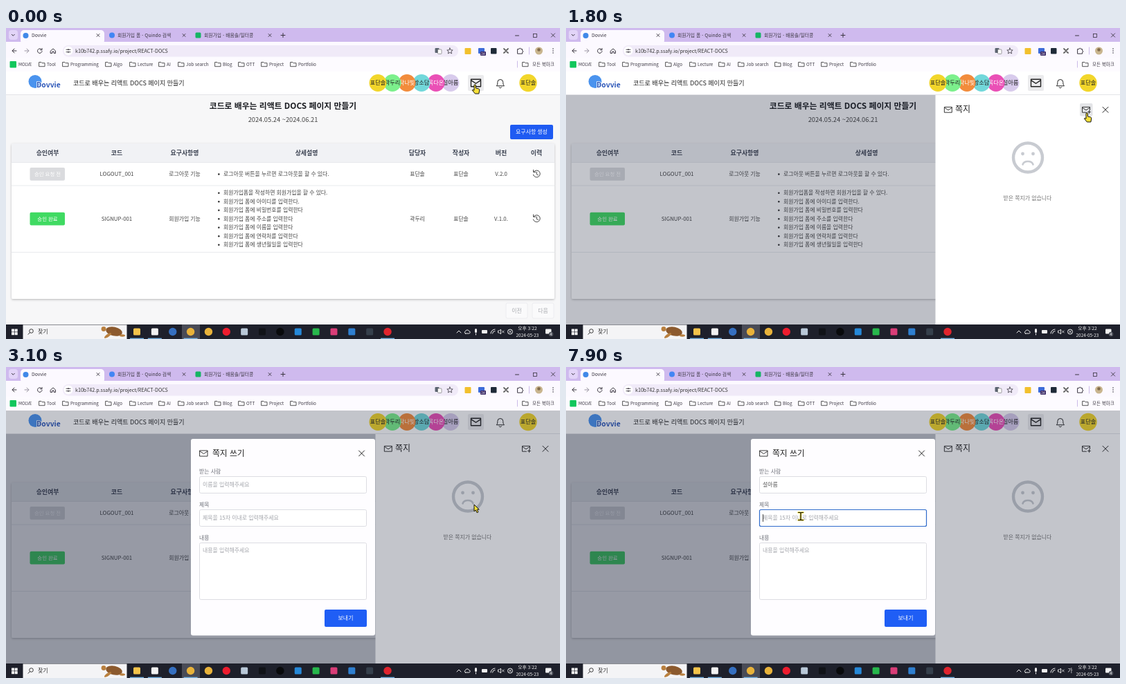
An HTML page that plays this animation: 800x450 px, repeating every 8 s.

```html
<!DOCTYPE html>
<html lang="ko">
<head>
<meta charset="utf-8">
<title>Message drawer</title>
<style>
html, body { margin: 0; width: 100%; height: 100%; overflow: hidden; background: #f7f7f8 }
svg { display: block; width: 800px; height: 450px; font-family: "Noto Sans CJK KR", "Noto Sans KR", "Noto Sans CJK", sans-serif; white-space: pre }
</style>
</head>
<body>
<svg id="stage" viewBox="0 0 800 450"></svg>
<script>
const PEOPLE = ['표단솔', '곽두리', '탁나빛', '방소담', '옥다온', '설아름'];
const TITLE = '코드로 배우는 리액트 DOCS 페이지 만들기';

// Drawing helpers, each returns SVG markup
const text = (x, cy, s, size, fill = '#333', more = '') =>
  `<text x="${x}" y="${cy + size * .36}" font-size="${size}" fill="${fill}" ${more}>${s}</text>`;
const MID = 'text-anchor="middle"', BOLD = 'font-weight="700"', LIGHT = 'font-weight="300"';
const mid = (x, cy, s, size, fill, more = '') => text(x, cy, s, size, fill, MID + ' ' + more);
const rect = (x, y, w, h, fill, r = 0, more = '') =>
  `<rect x="${x}" y="${y}" width="${w}" height="${h}" fill="${fill}" rx="${r}" ${more}/>`;
const circle = (x, y, r, fill, more = '') => `<circle cx="${x}" cy="${y}" r="${r}" fill="${fill}" ${more}/>`;
const line = (d, stroke = '#333', w = 1, more = '') =>
  `<path d="${d}" fill="none" stroke="${stroke}" stroke-width="${w}" stroke-linecap="round" stroke-linejoin="round" ${more}/>`;
const cross = (x, y, r, color = '#333', w = 1) =>
  line(`M${x - r} ${y - r}l${2 * r} ${2 * r}m0 ${-2 * r}l${-2 * r} ${2 * r}`, color, w);
const group = (id, body, more = '') => `<g id="${id}" ${more}>${body}</g>`;
const mail = (x, y, w, sw = .9) => {
  const h = w * .74, l = x - w / 2, t = y - h / 2;
  return line(`M${l} ${t}h${w}v${h}h${-w}zm0 ${h * .12}l${w / 2} ${h * .45}l${w / 2} ${-h * .45}`, '#222', sw);
};
const folder = (x, y) => line(`M${x - 4} ${y - 3}h3l1 1.2h4v5h-8z`, '#444', .9);
const field = (y, h) => rect(279.5, y + .5, 241, h - 1, '#fff', 2, 'stroke="#dcdde2"');
const focusRing = (id, y) => group(id,
  rect(279.5, y + .5, 241, 24, 'none', 2, 'stroke="#2f6bcb" stroke-width="1.2"') +
  group(id + 'Caret', line(`M284.5 ${y + 7.5}v10`, '#111', .8)));
const shade = (id, y) => rect(0, y, 800, 429 - y, '#1a1f38', 0, `id="${id}" opacity="0"`);

function browser() {
  const ink = '#3a3640';
  let s = rect(0, 0, 800, 22, '#cfbaee') + rect(4, 3, 13, 14, '#e2d4f8', 4) + line('M8.3 9.3l2 2l2-2', ink)
    + rect(21, 3, 121, 20, '#fcf9ff', 5) + rect(0, 20, 800, 23, '#fcf9ff') + rect(82, 25, 571, 16.5, '#f0eaf8', 8)
    + rect(0, 43, 800, 20, '#fdfbff');
  s += circle(28.5, 11, 4, '#4089e8') + text(37, 11, 'Dovvie', 6.8, ink)
    + circle(153, 10.5, 4, '#4285f4') + text(161, 11, '회원가입 폼 - Quindo 검색', 6.8, ink)
    + rect(273.5, 6.5, 8, 8, '#16b464', 1.5) + text(286, 11, '회원가입 - 배움솔/일터콩', 6.8, ink);
  for (const x of [133, 257, 381]) s += cross(x, 10.5, 2, ink, .9);
  s += line('M397 10.5h6m-3-3v6', ink) + line('M735.5 11h5', ink) + rect(761.5, 8.5, 5, 5, 'none', 0, `stroke="${ink}" stroke-width=".8"`) + cross(790, 10.5, 2.6, ink, .9);
  s += line('M15 33h-6m3-3l-3 3l3 3', ink) + line('M27 33h6m-3-3l3 3l-3 3', '#9b95a3')
    + line('M51.5 31.2a3.3 3.3 0 1 0 .6 2.4M52 29.5v2.3h-2.3', ink) + line('M64.5 33l3.5-3l3.5 3v3.5h-2.3v-2.5h-2.4v2.5h-2.3z', ink)
    + circle(90, 33, 6.5, '#fff') + line('M87 31.3h2m2 0h2m-6 3.4h2m2 0h2', ink, .9) + circle(90, 31.3, 1, ink) + circle(90, 34.7, 1, ink)
    + text(100, 33, 'k10b742.p.ssafy.io/project/REACT-DOCS', 7.15, '#333')
    + rect(619.5, 29, 6, 7, '#5b6470', 1) + rect(623.5, 31, 5.5, 6.5, '#fff', 1, 'stroke="#777" stroke-width=".7"')
    + line('M641 29l1.2 2.8l3 .2l-2.3 2l.8 3l-2.7-1.6l-2.7 1.6l.8-3l-2.3-2l3-.2z', ink, .8);
  s += rect(662.5, 29, 9, 9, '#f2c02c', 1) + rect(682, 29, 9, 8, '#3d6bd8', 1) + rect(685, 34, 8, 6, '#3b2a66', 1) + mid(689, 37, '2d', 4.5, '#fff')
    + rect(700, 29, 8.5, 8.5, '#1f2a38', 1) + cross(722, 33, 3, '#666', 1.8)
    + line('M739 30.5h2a1.2 1.2 0 0 1 2.5 0h2v2.3a1.2 1.2 0 0 1 0 2.4v2h-6.5z', ink, 1) + line('M755.5 28v10', '#cbbbe8')
    + circle(769.5, 33, 5.5, '#c9b58e') + circle(769.5, 31.5, 2.3, '#806a4c') + [30, 33, 36].map(y => circle(790, y, .8, ink)).join('');
  s += rect(5.5, 48, 9.5, 9.5, '#11c75c', 1) + text(18, 52.5, 'MOLVE', 6.1, ink);
  const marks = { Tool: 48, Programming: 82, Algo: 144, Lecture: 179, AI: 221, 'Job search': 249, Blog: 302, OTT: 336, Project: 369, Portfolio: 411 };
  for (const name in marks) s += folder(marks[name] + 4, 52.5) + text(marks[name] + 11, 52.5, name, 6.4, ink);
  return s + line('M738.5 48v9', '#cbbbe8') + folder(750, 52.5) + text(760, 52.5, '모든 북마크', 6.5, ink);
}

function navbar() {
  const colors = ['#f2d62b', '#7cf08c', '#f28c3c', '#72d8da', '#ea50b6', '#d8cbec'];
  let s = rect(0, 63, 800, 34, '#fff') + line('M0 96.5h800', '#e3e4e8')
    + circle(42, 77.5, 9.5, '#4a93ee') + text(44, 82, 'Dovvie', 10.3, '#2b56b8', BOLD + ' stroke="#fff" stroke-width="1.6" paint-order="stroke"')
    + text(97, 79.5, TITLE, 9, '#222');
  for (let i = 5; i >= 0; i--)
    s += circle(537 + 21 * i, 79.5, 12.5, colors[i]) + mid(537 + 21 * i, 79.5, PEOPLE[i], 8.2, i == 2 || i == 4 ? '#fff' : '#222');
  return s + rect(667, 68, 23, 23, '#ebebed', 2) + mail(678.5, 79.5, 14, 1.4)
    + line('M708.5 83.5c1.5-1.5 1.3-3 1.3-5a4 4 0 0 1 8 0c0 2 0 3.5 1.4 5zm3.7 2.2a1.7 1.7 0 0 0 3.2 0', '#222', 1)
    + circle(754, 79.5, 12.7, '#f2d62b') + mid(754, 79.5, PEOPLE[0], 8.2, '#222');
}

function requirements() {
  const cols = [60, 160, 258, 434, 594, 657, 715, 766];
  const heads = ['승인여부', '코드', '요구사항명', '상세설명', '담당자', '작성자', '버전', '이력'];
  const list = ['회원가입폼을 작성하면 회원가입을 할 수 있다.',
    ...['아이디를 입력한다.', '비밀번호를 입력한다', '주소를 입력한다', '이름을 입력한다', '연락처를 입력한다', '생년월일을 입력한다'].map(e => '회원가입 폼에 ' + e)];
  const row = (y, cells, state, color, items) => {
    let s = rect(34.5, y - 9.3, 50.5, 18.8, color, 2) + mid(60, y, state, 7.4, '#fff');
    for (const i in cells) if (cells[i]) s += mid(cols[i], y, cells[i], 7.85, '#444', LIGHT);
    items.forEach((item, i) => {
      const cy = y + (i - (items.length - 1) / 2) * 12.5;
      s += circle(307.3, cy + .3, 1.3, '#333') + text(314, cy, item, 7.85, '#444', LIGHT);
    });
    return s + line(`M762 ${y - 3}a5 5 0 1 1 -.6 4m.2-7v3.2h3.2M766.3 ${y - 2.8}v3.2l2.2 1.2`, '#444', 1);
  };
  let s = rect(0, 97, 800, 332, '#f7f7f8') + mid(400, 113, TITLE, 11.85, '#1b1d22', BOLD)
    + mid(400, 132.5, '2024.05.24 ~2024.06.21', 9.3, '#444', LIGHT)
    + rect(728, 140, 62, 21, '#1f5bf2', 2) + mid(759, 150.5, '요구사항 생성', 7.9, '#fff')
    + rect(8, 167, 784, 225, '#fff', 2, 'filter="url(#soft)"') + rect(8, 167, 784, 27.5, '#f1f2f5');
  heads.forEach((h, i) => s += mid(cols[i], 180.7, h, 8.9, '#3a4150', BOLD));
  for (const y of [194.5, 228, 324.5]) s += line(`M8 ${y}h784`, '#e3e5e9', .8);
  s += row(211.3, [0, 'LOGOUT_001', '로그아웃 기능', 0, PEOPLE[0], PEOPLE[0], 'V.2.0'], '승인 요청 전', '#dadbde', ['로그아웃 버튼을 누르면 로그아웃을 할 수 있다.'])
    + row(276, [0, 'SIGNUP-001', '회원가입 기능', 0, PEOPLE[1], PEOPLE[0], 'V.1.0.'], '승인 완료', '#40da62', list);
  ['이전', '다음'].forEach((label, i) =>
    s += rect(722 + 38 * i, 398, 31, 22, '#fafafb', 2, 'stroke="#ededf0"') + mid(737.5 + 38 * i, 409, label, 7.9, '#a9abb0'));
  return s;
}

const drawer = () => rect(533.5, 97, 267, 332, '#fff') + mail(552, 118.3, 10.5) + text(562, 118, '쪽지', 12, '#222')
  + rect(742, 109, 18.5, 18.5, '#e3e4e7', 2, 'id="hover"')
  + line('M751.5 122.2h-6v-7.8h11v4.5m-11-3.6l5.5 3.5l5.5-3.5m-3 6.2h4m-2-2v4', '#222', .9) + cross(779, 118.3, 4, '#222')
  + circle(667, 187.5, 21, 'none', 'stroke="#c8cbd1" stroke-width="4.4"')
  + circle(659.5, 182, 2.4, '#c8cbd1') + circle(674.5, 182, 2.4, '#c8cbd1') + line('M659.5 197.5c2-6 13-6 15 0', '#c8cbd1', 2.6)
  + mid(666.5, 246, '받은 쪽지가 없습니다', 7.9, '#777', LIGHT);

function dialog() {
  const team = ['2 (B742 기획자)', '5 (B742 PM)', '0 (B742 기획자)', '1 (B742 FE 개발자)', '3 (B742 INFRA 개발자)'];
  const hint = '#a3a5ab', label = '#6d7078';
  return rect(267, 104, 266, 284.5, '#fefdff', 3) + mail(285.5, 125, 11) + text(298, 124.5, '쪽지 쓰기', 11.8, '#222') + cross(513.5, 125, 4, '#222')
    + text(279, 151.5, '받는 사람', 7.9, label, LIGHT) + field(158, 25)
    + text(284, 170.5, '이름을 입력해주세요', 7.9, hint, LIGHT + ' id="nameHint"') + text(284, 170.5, PEOPLE[5], 7.9, '#555', LIGHT + ' id="nameValue"')
    + text(279, 199, '제목', 7.9, label, LIGHT) + field(206, 25) + text(284, 218.3, '제목을 15자 이내로 입력해주세요', 7.9, hint, LIGHT)
    + text(279, 247, '내용', 7.9, label, LIGHT) + field(254, 83) + text(284, 265, '내용을 입력해주세요', 7.9, hint, LIGHT)
    + rect(460, 351, 61, 25, '#1f5ef5', 2) + mid(490.5, 363.5, '보내기', 7.9, '#fff')
    + focusRing('nameFocus', 158) + focusRing('titleFocus', 206)
    + group('menu', rect(279, 184, 242, 126, '#fff', 2, 'filter="url(#soft)"') + rect(516.7, 185, 3.8, 101, '#d2d3d6', 1.5)
      + team.map((e, i) => text(290, 199.5 + 25 * i, PEOPLE[e[0]] + e.slice(1), 7.9, '#555', LIGHT)).join(''));
}

function taskbar() {
  let s = rect(0, 429, 800, 21, '#1e202b') + rect(24.5, 429.5, 150, 20.5, '#f4f4f6');
  for (const [x, y] of [[8, 435.5], [12.7, 435.5], [8, 440.2], [12.7, 440.2]]) s += rect(x, y, 4, 4, '#fff');
  s += circle(36.5, 438.5, 2.8, 'none', 'stroke="#333"') + line('M34.5 440.7l-2.5 2.6', '#333') + text(46, 439.5, '찾기', 8, '#333')
    + '<g fill="#b9803f"><ellipse cx="156" cy="439" rx="12" ry="6.5" transform="rotate(12 156 439)" fill="#8c5a2e"/><circle cx="141" cy="435.5" r="3.4"/><ellipse cx="147" cy="445" rx="6" ry="2" transform="rotate(-35 147 445)"/><ellipse cx="168" cy="445" rx="4" ry="1.7"/></g>'
    + rect(254, 429, 26, 21, '#494b56');
  const apps = ['#f3c34b', '#f2f2f2', 'o#356fc0', 'o#e8b23a', 'o#e8b23a', 'o#ee1c2e', '#b9c8d8', '#111318', 'o#090a0c', '#2688d8', '#27b84c', '#d93d78', '#2f7fd0', '#36404c', 'o#e0242e'];
  apps.forEach((c, i) => {
    const x = 189 + 25.86 * i;
    s += c[0] == 'o' ? circle(x, 439.5, 5.7, c.slice(1)) : rect(x - 5, 434.5, 10, 10, c, 1.5);
    if ([0, 1, 3, 14].includes(i)) s += rect(x - 10, 448.7, 20, 1.3, '#78b6e8');
  });
  s += line('M651 441l3-3l3 3', '#eee') + line('M663.5 442h5a1.7 1.7 0 0 0 0-3.4a2.6 2.6 0 0 0-5 .3a1.6 1.6 0 0 0 0 3.1z', '#eee')
    + rect(677, 435, 3, 6, '#eee', 1.5) + line('M678.5 442v2', '#eee') + rect(687, 437, 8, 5, '#eee', 1)
    + line('M700 442a6 6 0 0 1 6-6m-3.5 6a3.5 3.5 0 0 1 3.5-3.5', '#eee') + line('M711 438h1.5l2-2v7l-2-2h-1.5z', '#eee', .9) + cross(717.8, 439.5, 1.5, '#eee', .8)
    + group('imeOff', circle(728, 439.5, 3.5, 'none', 'stroke="#eee"') + cross(728, 439.5, 1.5, '#eee', .9)) + mid(728, 439.5, '가', 8, '#eee', 'id="imeOn"')
    + mid(753, 435, '오후 3:22', 6.8, '#f2f2f2') + mid(753, 444.3, '2024-05-23', 6.4, '#f2f2f2')
    + rect(779, 435.5, 8.5, 7, '#f2f2f2', 1) + circle(787, 443, 3.2, '#555862') + mid(787, 443, '4', 5, '#fff');
  return s;
}

const pointer = (id, d) => group(id, `<path d="${d}" fill="#f7e13a" stroke="#111" stroke-width="1" stroke-linejoin="round"/>`);
const ibeam = 'M-3.5-5.5h2.5l1 .7l1-.7h2.5m-3.5 .5v10m-3.5 .5h2.5l1-.7l1 .7h2.5';

const stage = document.getElementById('stage');
stage.innerHTML = `<defs><filter id="soft" x="-5%" y="-10%" width="110%" height="125%"><feDropShadow dx="0" dy="1.2" stdDeviation="1.5" flood-opacity=".25"/></filter></defs>`
  + requirements() + shade('pageShade', 97) + group('drawer', drawer()) + navbar() + shade('allShade', 63) + group('dialog', dialog()) + browser() + taskbar()
  + group('cursor', pointer('arrow', 'M0 0v10l2.3-2l1.8 3.8l1.9-.9l-1.8-3.7h3z')
    + pointer('hand', 'M-1 1a1.2 1.2 0 0 1 2.4 0v4l4 .9q1.6.5 1.3 2.2l-.8 4.9h-5.6l-4-5q.5-1.5 2.7.2z')
    + group('beam', line(ibeam, '#f7e13a', 2.6) + line(ibeam, '#111', 1.2)));

const el = {};
stage.querySelectorAll('[id]').forEach(node => el[node.id] = node);
const show = (id, on) => el[id].style.display = on ? '' : 'none';
const ramp = (t, start, length) => {
  const p = Math.min(1, Math.max(0, (t - start) / length));
  return p * p * (3 - 2 * p);
};

// Cursor stops: time, x, y
const STOPS = [[0, 677, 82], [950, 677, 82], [1600, 752, 123], [1950, 752, 123], [2400, 641, 188], [2700, 676, 199], [3650, 676, 199],
  [4300, 375, 174], [4600, 375, 174], [5100, 322, 223], [5450, 322, 223], [6000, 340, 176], [6200, 340, 176], [6400, 338.5, 205], [6500, 338.5, 205], [6700, 339, 216], [8000, 339, 216]];
function cursorAt(t) {
  const i = STOPS.findIndex(stop => stop[0] > t), [t0, x0, y0] = STOPS[i - 1], [t1, x1, y1] = STOPS[i];
  const p = ramp(t, t0, t1 - t0);
  return [x0 + (x1 - x0) * p, y0 + (y1 - y0) * p];
}

function draw(t) {
  const [x, y] = cursorAt(t);
  const near = (cx, cy) => Math.hypot(x - cx, y - cy) < 13;
  const within = (top, bottom) => x > 279 && x < 521 && y > top && y < bottom;
  const menu = t >= 4500 && t < 5400, titled = t >= 6800, dialogOpen = t >= 2150;
  const onNew = near(751, 118) && !dialogOpen;

  el.pageShade.setAttribute('opacity', .26 * ramp(t, 400, 200));
  el.drawer.setAttribute('transform', `translate(${267 * (1 - ramp(t, 400, 345))} 0)`);
  el.allShade.setAttribute('opacity', .26 * ramp(t, 2150, 200));
  el.dialog.setAttribute('opacity', ramp(t, 2150, 300));
  show('hover', onNew);
  show('menu', menu);
  show('nameFocus', menu);
  show('nameFocusCaret', (t - 4500) % 1060 < 530);
  show('titleFocus', titled);
  show('titleFocusCaret', (t - 6800) % 1060 < 530);
  show('nameHint', t < 5400);
  show('nameValue', t >= 5400);
  const typing = menu || t >= 6300;
  show('imeOn', typing);
  show('imeOff', !typing);

  const hand = near(678, 80) || onNew || menu && within(186, 310);
  const beam = dialogOpen && !hand && (within(158, 183) || within(206, 231));
  show('hand', hand);
  show('beam', beam);
  show('arrow', !hand && !beam);
  el.cursor.setAttribute('transform', `translate(${x} ${y})`);
}

const start = performance.now();
(function tick() {
  draw((performance.now() - start) % 8000);
  requestAnimationFrame(tick);
})();
</script>
</body>
</html>
```
